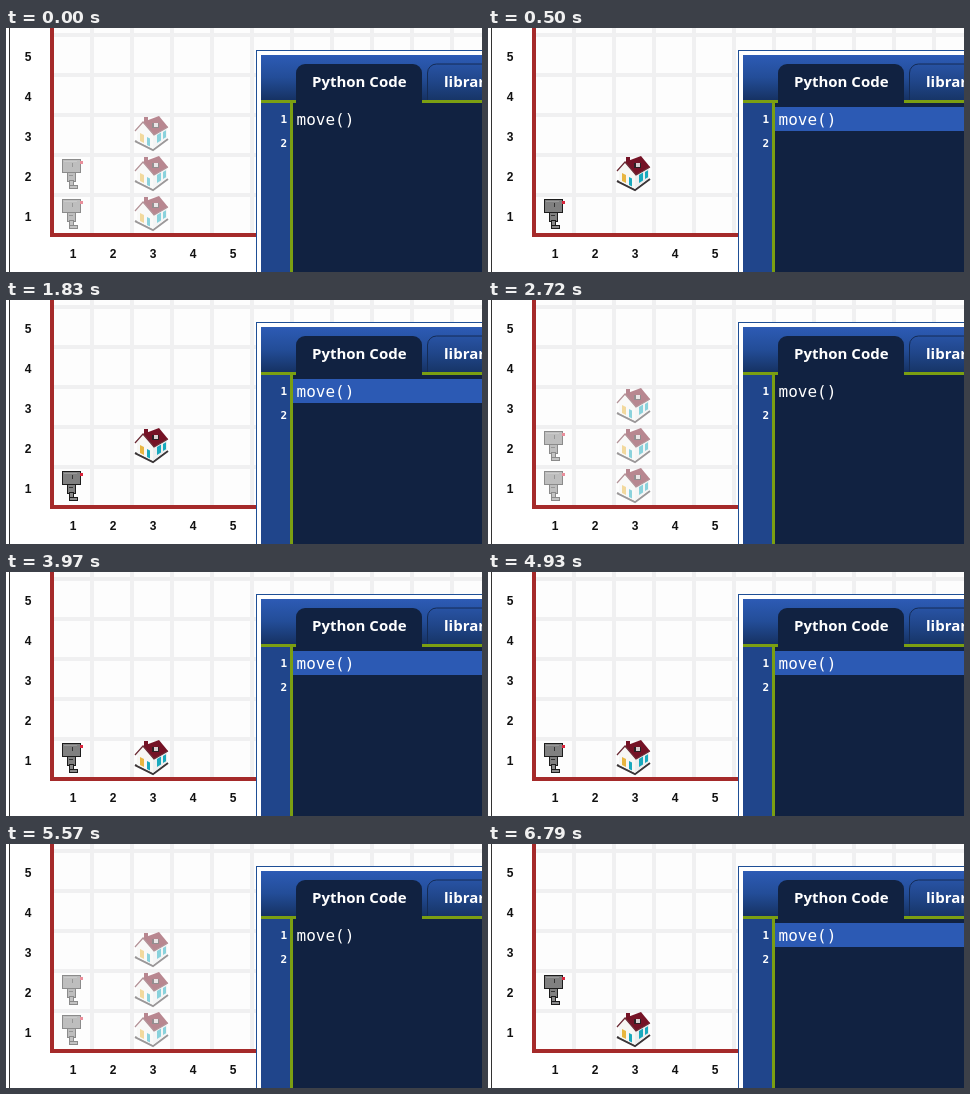
Recreate the animation shown at these times as an HTML page with a canvas. Size 476 by 244 pixels, loop 8000 ms.

```html
<!DOCTYPE html>
<html lang="en">
<head>
<meta charset="utf-8">
<title>Robot world</title>
<style>
html, body { margin: 0; width: 476px; height: 244px; overflow: hidden; background: #fff; }
canvas { display: block; }
</style>
</head>
<body>
<canvas id="stage" width="476" height="244"></canvas>
<script>
const stage = document.getElementById('stage').getContext('2d');
let ctx = stage;
const LOOP = 8000, CELL = 40;
const GREEN = '#7b9f12', NAVY = '#112241', WALL = '#a52a2a';

// Columns and rows count from 1; idle shows every possible spot, faded.
const idle = { robots: [[1, 1], [1, 2]], houses: [[3, 1], [3, 2], [3, 3]], running: false };
const run = (robot, house) => ({ robots: [robot], houses: [house], running: true });
const scenes = [
  { end: 500, ...idle },
  { end: 2720, ...run([1, 1], [3, 2]) },
  { end: 3970, ...idle },
  { end: 5570, ...run([1, 1], [3, 1]) },
  { end: 6790, ...idle },
  { end: LOOP, ...run([1, 2], [3, 1]) }
];

function rect(color, x, y, w, h) {
  ctx.fillStyle = color;
  ctx.fillRect(x, y, w, h);
}

function box(fill, x, y, w, h) {
  rect('#1c1c1c', x, y, w, h);
  rect(fill, x + 1, y + 1, w - 2, h - 2);
}

function path(...pts) {
  ctx.beginPath();
  for (let i = 0; i < pts.length; i += 2) ctx.lineTo(pts[i], pts[i + 1]);
}

function poly(color, ...pts) {
  path(...pts);
  ctx.fillStyle = color;
  ctx.fill();
}

function line(color, width, ...pts) {
  path(...pts);
  ctx.strokeStyle = color;
  ctx.lineWidth = width;
  ctx.stroke();
}

// An upright pane on a wall that rises or falls with the given slope.
function pane(color, x, y, w, h, slope) {
  const d = w * slope;
  poly(color, x, y, x + w, y + d, x + w, y + h + d, x, y + h);
}

function text(str, x, y, font, color, align = 'left') {
  ctx.font = font;
  ctx.fillStyle = color;
  ctx.textAlign = align;
  ctx.fillText(str, x, y);
}

function gradient(y0, y1, ...colors) {
  const g = ctx.createLinearGradient(0, y0, 0, y1);
  colors.forEach((c, i) => g.addColorStop(i / (colors.length - 1), c));
  return g;
}

function drawGrid() {
  rect('#fff', 0, 0, 476, 244);
  rect('#fdfdfd', 48, 0, 428, 205);
  for (let y = 5; y < 200; y += CELL) rect('#f0f0f1', 48, y, 428, 4);
  for (let x = 84; x < 476; x += CELL) rect('#f0f0f1', x, 0, 4, 205);
  rect('#333', 3, 0, 1, 244);
  rect(WALL, 44, 0, 4, 209);
  rect(WALL, 44, 205, 206, 4);
  const font = 'bold 12px "Liberation Sans", Arial, sans-serif';
  for (let n = 1; n <= 5; n++) {
    text(n, 27 + n * CELL, 230, font, '#111', 'center');
    text(n, 22, 233 - n * CELL, font, '#111', 'center');
  }
}

function drawRobot() {
  box('#808080', 13, 17, 9, 10);
  box('#8a8a8a', 15, 25, 5, 9);
  box('#8a8a8a', 15, 30, 9, 4);
  box('#808080', 8, 4, 19, 14);
  rect('#999', 10, 6, 13, 1);
  rect('#333', 18, 8, 1, 4);
  rect('#333', 15, 20, 4, 1);
  rect('#d9243b', 26, 6, 3, 3);
}

function drawHouse() {
  line('#3b3638', 2, 1, 26, 19, 35, 34, 24);
  poly('#f7f7f4', 3, 15, 9, 8, 19, 20, 19, 34, 3, 26);
  poly('#eceeee', 19, 20, 33, 13, 33, 23, 19, 34);
  pane('#e8b640', 6, 18, 4, 8, 0.5);
  pane('#19a9bd', 13, 22, 3, 8, 0.5);
  pane('#19a9bd', 23, 20, 4, 8, -0.6);
  pane('#19a9bd', 29, 17, 3, 7, -0.6);
  poly('#751326', 9, 7, 25, 1, 34, 12, 20, 20);
  line('#6b2b35', 1.2, 1, 16, 9, 7, 20, 20, 34, 12);
  rect('#751326', 10, 2, 4, 5);
  rect('#2b2024', 18, 8, 7, 5);
  rect('#d8cfd0', 20, 8, 4, 4);
}

// Pre-rendered so that fading treats each figure as a whole.
function sprite(draw) {
  const canvas = document.createElement('canvas');
  canvas.width = canvas.height = CELL;
  ctx = canvas.getContext('2d');
  draw();
  ctx = stage;
  return canvas;
}

function place(img, cells, alpha) {
  ctx.globalAlpha = alpha;
  for (const [col, row] of cells) ctx.drawImage(img, 8 + col * CELL, 207 - row * CELL);
  ctx.globalAlpha = 1;
}

function drawTab(x, w, fill, border) {
  ctx.beginPath();
  ctx.roundRect(x, 36, w, 39, [9, 9, 0, 0]);
  ctx.fillStyle = fill;
  ctx.fill();
  if (border) {
    ctx.strokeStyle = border;
    ctx.lineWidth = 1;
    ctx.stroke();
  }
}

function drawEditor(running) {
  rect('#1f4f96', 250, 22, 226, 222);
  rect('#fff', 251, 23, 225, 221);
  rect(gradient(27, 72, '#2d5bb5', '#234d98', '#163263'), 255, 27, 221, 45);
  drawTab(421.5, 90, gradient(36, 72, '#2853a4', '#204588', '#173567'), '#142b55');
  rect(GREEN, 255, 72, 221, 3);
  rect('#20458b', 255, 75, 29, 169);
  rect(NAVY, 287, 75, 189, 169);
  drawTab(290, 126, NAVY);
  rect(GREEN, 284, 75, 3, 169);
  if (running) rect('#2c5ab4', 287, 79, 189, 24);

  const tabFont = 'bold 15px "Open Sans", "Noto Sans", sans-serif';
  text('Python Code', 306, 59, tabFont, '#fff');
  text('library', 438, 59, tabFont, '#fff');

  const mono = '"DejaVu Sans Mono", monospace';
  for (let n = 1; n <= 2; n++) text(n, 281, 71 + n * 24, 'bold 11px ' + mono, '#fff', 'right');
  text('move()', 290.5, 97, '16px ' + mono, '#fff');
}

const robot = sprite(drawRobot), house = sprite(drawHouse);

function frame(now) {
  const t = now % LOOP;
  const { robots, houses, running } = scenes.find(s => t < s.end);
  const alpha = running ? 1 : 0.5;
  drawGrid();
  place(robot, robots, alpha);
  place(house, houses, alpha);
  drawEditor(running);
  requestAnimationFrame(frame);
}

frame(0);
</script>
</body>
</html>
```
